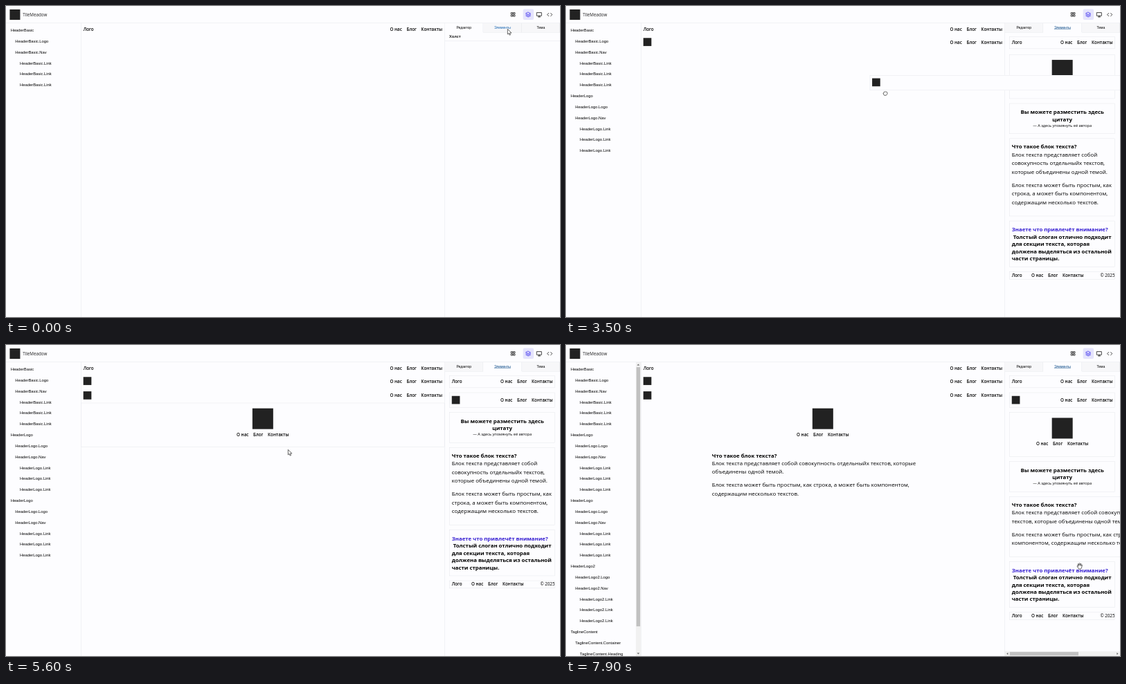
An HTML page that plays this animation: 800x450 px, repeating every 8000 ms.

```html
<!DOCTYPE html>
<html lang="ru">
<head>
<meta charset="utf-8">
<title>TileMeadow</title>
<style>
html, body { margin: 0; width: 100%; height: 100%; overflow: hidden; background: #fdfdff; }
/* The interface is laid out at 1920 x 1080 and shown at 800 x 450. */
#stage { position: absolute; left: 0; top: 0; width: 1920px; height: 1080px; overflow: hidden;
  transform: scale(.4166667); transform-origin: 0 0; background: #fdfdff; color: #000;
  font: 15px "Open Sans", "Noto Sans", sans-serif; white-space: nowrap; }
#stage * { box-sizing: border-box; }
#stage > *, .at { position: absolute; }
p, h3 { margin: 0; }
.line { background: #e0e3e8; }
.brand { left: 58px; top: 19px; line-height: 22px; color: #222; }
.mark { background: #222; flex: none; }
.tree { left: 0; top: 65px; width: 260px; height: 1015px; overflow: hidden;
  font: 14px/38px "Liberation Sans", Arial, sans-serif; }
.leaf { padding-left: 48px; }
.tab { top: 60px; height: 32px; border: solid #e0e3e8; border-width: 0 1px 1px 0; background: #f7f7f9;
  text-align: center; font: 12px/30px "Liberation Sans", Arial, sans-serif; }
.tab.on { background: #fdfdff; border-bottom-color: transparent; }
.tab.picked { color: #0b4a86; text-decoration: underline; }
.tab.hover { color: #1463b0; }
.canvas { left: 260px; top: 59px; width: 1260px; }
.panel { left: 1521px; top: 93px; width: 399px; height: 987px; overflow: hidden; }
.list { position: absolute; left: 16px; top: 13px; }
.item { position: relative; border: 1px solid #dfe2e8; background: #fdfdff; width: 366px; }
.list > .item { margin-bottom: 16px; }
.canvas > .item { border-color: transparent; background: none; width: 1260px; }
#drag { z-index: 2; }
.bar { display: flex; align-items: center; justify-content: space-between; padding: 0 7px 2px; font-weight: 600; }
.nav { display: flex; gap: 16px; font-weight: 600; }
.basic { height: 43px; }
.canvas .basic { height: 42px; padding-bottom: 0; }
.logo { height: 53px; }
.canvas .logo { height: 50px; }
.logo .mark { width: 28px; height: 28px; }
.logo2 { height: 154px; }
.logo2 .mark { position: absolute; left: calc(50% - 36px); top: 18px; width: 72px; height: 72px; }
.logo2 .nav { position: absolute; left: 0; right: 0; top: 97px; line-height: 22px; justify-content: center; }
.quote { height: 106px; padding-top: 16px; text-align: center; }
.quote, .tagline, .text h3 { font: 700 18.7px/25px "Open Sans", "Noto Sans", sans-serif; }
.quote p { font-size: 13.3px; line-height: 18px; font-weight: 400; }
.text { padding: 14px 7px 33px; white-space: normal; }
.text div { max-width: 768px; margin: auto; }
.text p { font-size: 19px; line-height: 30px; margin: 0 -6px 0 0; }
.text p + p { margin-top: 15.5px; }
.tagline { height: 160px; padding: 16px 7px; }
.tagline span { color: #3720d2; }
.footer { height: 27px; padding-right: 0; }
.footer .nav { margin-right: auto; margin-left: 32px; }
.footer span { font-weight: 400; }
.scroll { background: #f1f1f1; }
.thumb { position: absolute; background: #c1c1c1; }
svg { overflow: visible; fill: none; stroke: #222; stroke-width: 2; stroke-linejoin: round; stroke-linecap: round; }
.arrows { fill: #666; stroke: none; }
#cursor { left: 0; top: 0; width: 1px; height: 1px; z-index: 3; }
#cursor path { fill: #fff; stroke: #333; stroke-width: 1.8; }
</style>
</head>
<body>
<div id="stage">
  <div class="mark" style="left:13px;top:12px;width:36px;height:36px"></div>
  <div class="brand">TileMeadow</div>
  <svg width="1920" height="60">
    <rect x="1792" y="11" width="37" height="37" rx="5" fill="#e5e4fc" stroke="none"/>
    <path d="M1751 23h5v5h-5zM1759 23h5v5h-5zM1751 31h5v5h-5zM1759 31h5v5h-5z"/>
    <path stroke="#4b3ff0" d="M1810 22l8 4-8 4-8-4zM1802 30l8 4 8-4M1802 34l8 4 8-4"/>
    <path d="M1840 23h16v11h-16zM1848 34v4M1844 38h8"/>
    <path d="M1881 25l-5 5 5 5M1888 25l5 5-5 5"/>
  </svg>
  <div class="line" style="left:0;top:59px;width:1920px;height:1px"></div>
  <div class="line" style="left:260px;top:59px;width:1px;height:1021px"></div>
  <div class="line" style="left:1520px;top:59px;width:1px;height:1021px"></div>
  <div class="tree" id="tree"></div>
  <div class="scroll" id="vbar" style="left:242px;top:60px;width:17px;height:1020px">
    <div class="thumb" style="left:2px;top:17px;width:13px;height:900px"></div>
    <svg class="arrows at" width="17" height="1020"><path d="M4 11l4.500-5 4.500 5zM4 1009l4.500 5 4.500-5z"/></svg>
  </div>
  <div class="canvas" id="canvas"></div>
  <div class="tab" id="tabEdit" style="left:1521px;width:133px">Редактор</div>
  <div class="tab" id="tabItems" style="left:1654px;width:134px">Элементы</div>
  <div class="tab" style="left:1788px;width:132px">Тема</div>
  <div class="panel" id="editor">
    <b class="at" style="left:15px;top:3px;font-size:14px;line-height:20px;font-weight:600">Холст</b>
    <div class="line at" style="left:0;top:28px;width:400px;height:1px"></div>
  </div>
  <div class="panel" id="elements">
    <div class="list" id="list"></div>
    <div class="scroll at" id="hbar" style="left:0;top:971px;width:399px;height:16px">
      <div class="thumb" id="hthumb" style="left:17px;top:2px;height:12px"></div>
      <svg class="arrows at" width="399" height="16"><path d="M11 4l-5 4 5 4zM388 4l5 4-5 4z"/></svg>
    </div>
  </div>
  <div id="drag"></div>
  <svg id="cursor">
    <path id="arrow" d="M-4-10v17l4-3.500 3 6.500 3-1.500-3-6h5.500z"/>
    <path id="grab" d="M-4 9l-5-8q-1-3 2-2l2 2-2-7q0-3 2.500-1l1.500 4v-6q2-3 3.500 0v6l1.500-5q2.500-2 3 1l-1 6 2-3q3-1 2 2l-2 7-2 4z"/>
    <path id="fist" d="M-4 6l-3-5q0-3 2-2v-3q2-3 4-1 2-2 4 0 3-1 4 2v5l-3 4z"/>
  </svg>
</div>
<script>
const LOOP = 8000, NARROW = 366, WIDE = 1260, GAP = 16, U = 2.4;
const OPEN_AT = 300, ENTER = 190, MORPH = 200, SETTLE = 270, SHRINK = 270, REST = 100;
const $ = id => document.getElementById(id);
const clamp = v => Math.max(0, Math.min(1, v));
const smooth = s => s * s * (3 - 2 * s);
const easeOut = s => 1 - (1 - s) ** 3;
const mix = (a, b, k) => a + (b - a) * k;
const mixPoint = (a, b, k) => [mix(a[0], b[0], k), mix(a[1], b[1], k)];
const show = (el, on) => { el.style.display = on ? '' : 'none'; };

const mark = '<div class="mark"></div>';
const nav = '<div class="nav"><div>О нас</div><div>Блог</div><div>Контакты</div></div>';
const parts = {
  basic: '<div>Лого</div>' + nav,
  logo: mark + nav,
  logo2: mark + nav,
  quote: 'Вы можете разместить здесь<br>цитату<p>— А здесь упомянуть её автора</p>',
  text: `<div><h3>Что такое блок текста?</h3>
    <p>Блок текста представляет собой совокупность отдельныйх текстов, которые объединены одной темой.</p>
    <p>Блок текста может быть простым, как строка, а может быть компонентом, содержащим несколько текстов.</p></div>`,
  tagline: `<span>Знаете что привлечёт внимание?</span><br>&nbsp;Толстый слоган отлично подходит<br>
    для секции текста, которая<br>должена выделяться из остальной<br>части страницы.`,
  footer: '<div>Лого</div>' + nav + '<span>© 2025</span>'
};

// Each drag runs from its place in the list to the next canvas row;
// grab and release are pointer positions on the 800 x 450 stage.
const drags = [
  { kind: 'logo', tree: 'HeaderLogo', start: 1800, land: 2500, grab: [693, 80], release: [400, 110], dip: 20 },
  { kind: 'logo', tree: 'HeaderLogo', start: 3120, land: 4030, grab: [690, 79], release: [405, 138], dip: 36 },
  { kind: 'logo2', tree: 'HeaderLogo2', start: 4680, land: 5350, grab: [657, 101], release: [409, 156], dip: 0 },
  { kind: 'text', tree: 'TaglineContent', start: 6820, land: 7426, grab: [680, 318], release: [291, 282], dip: 5 }
];
const firstPoint = [726, 38], lastPoint = [742, 320];

function fill(el, kind) {
  const bar = ['basic', 'logo', 'footer'].includes(kind) ? 'bar' : '';
  el.className = `item ${bar} ${kind}`;
  el.innerHTML = parts[kind];
  return el;
}
const addItem = (parent, kind) => fill(parent.appendChild(document.createElement('div')), kind);

function addBranch(name, children, leaves) {
  const group = $('tree').appendChild(document.createElement('div'));
  const row = (depth, text) => `<div style="padding-left:${16 * depth}px">${text}</div>`;
  group.innerHTML = row(1, name) + children.map(c => row(2, `${name}.${c}`)).join('') +
    leaves.map(c => row(3, `${name}.${c}`)).join('');
  return group;
}
const addHeader = name => addBranch(name, ['Logo', 'Nav'], Array(3).fill('Link'));

function place(el) {
  let x = 0, y = 0;
  for (; el !== $('stage'); el = el.offsetParent) {
    x += el.offsetLeft;
    y += el.offsetTop;
  }
  return [x, y];
}

const items = {};
for (const kind in parts) items[kind] = addItem($('list'), kind);
addItem($('canvas'), 'basic');
addHeader('HeaderBasic');
for (const d of drags) {
  d.row = addItem($('canvas'), d.kind);
  d.branch = d.kind === 'text' ? addBranch(d.tree, ['Container'], ['Heading']) : addHeader(d.tree);
  d.done = d.land + SETTLE;
  d.home = place(items[d.kind]);
  d.slot = place(d.row);
  d.height = items[d.kind].offsetHeight;
}
let dragKind = '';

const progress = (d, t) => clamp((t - d.start) / (d.land - d.start));
const morph = (d, t) => clamp((t - d.start - ENTER) / MORPH);

function layoutList(t) {
  let width = NARROW;
  for (const d of drags) items[d.kind].style.cssText = '';
  for (const d of drags) {
    const style = items[d.kind].style;
    if (t >= d.start && t < d.done) {
      const left = 1 - morph(d, t);
      Object.assign(style, { visibility: 'hidden', overflow: 'hidden', padding: '0', borderWidth: '0',
        height: d.height * left + 'px', marginBottom: GAP * left + 'px' });
    } else if (t >= d.done && t < d.done + SHRINK) {
      width = mix(WIDE, NARROW, (t - d.done) / SHRINK);
      style.width = width + 'px';
    }
  }
  show($('hbar'), width > NARROW + GAP);
  $('hthumb').style.width = 365 * 400 / (width + 2 * GAP) + 'px';
}

function drawDrag(t) {
  const d = drags.find(d => t >= d.start && t < d.done), box = $('drag');
  show(box, d);
  if (!d) return;
  if (dragKind !== d.kind) fill(box, dragKind = d.kind);
  const s = progress(d, t), [x, y] = mixPoint(d.home, d.slot, smooth(s));
  Object.assign(box.style, { left: x + 'px', top: y + d.dip * U * Math.sin(Math.PI * smooth(s)) + 'px',
    width: mix(NARROW, WIDE, morph(d, t)) + 'px' });
}

function pointerAt(t) {
  let from = firstPoint, leave = 2 * OPEN_AT;
  for (const d of drags) {
    if (t < d.start) return mixPoint(from, d.grab, smooth(clamp((t - leave) / (d.start - REST - leave))));
    if (t < d.done) return mixPoint(d.grab, d.release, easeOut(progress(d, t)));
    from = d.release;
    leave = d.done;
  }
  return mixPoint(from, lastPoint, smooth(clamp((t - leave) / (LOOP - REST - leave))));
}

function drawCursor(t) {
  const [x, y] = pointerAt(t);
  const held = drags.some(d => t >= d.start && t < d.land);
  const type = held ? 'fist' : t > OPEN_AT && x > 640 && y > 44 ? 'grab' : 'arrow';
  for (const id of ['arrow', 'grab', 'fist']) show($(id), id === type);
  $('cursor').style.transform = `translate(${x * U}px, ${y * U}px)`;
}

function draw(t) {
  const open = t >= OPEN_AT;
  show($('editor'), !open);
  show($('elements'), open);
  $('tabEdit').className = open ? 'tab' : 'tab on';
  $('tabItems').className = open ? 'tab on picked' : 'tab hover';
  for (const d of drags) {
    show(d.row, t >= d.done);
    show(d.branch, t >= d.done);
  }
  show($('vbar'), t >= drags[3].done);
  layoutList(t);
  drawDrag(t);
  drawCursor(t);
}

const begin = performance.now();
function frame() {
  draw((performance.now() - begin) % LOOP);
  requestAnimationFrame(frame);
}
frame();
</script>
</body>
</html>
```
